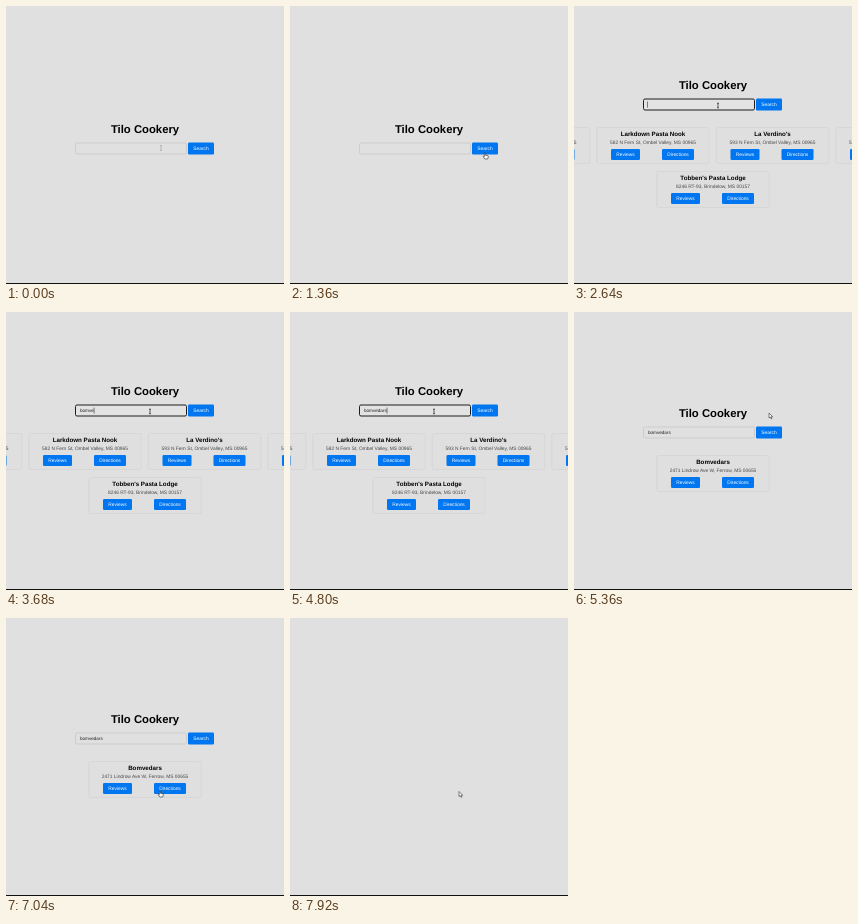
An HTML page for the animation above (8000 ms loop, 278 by 278 pixels).

```html
<!DOCTYPE html>
<html lang="en">
<head>
<meta charset="utf-8">
<title>Restaurant search</title>
<style>
html, body { margin: 0; width: 100%; height: 100%; overflow: hidden; background: #e0e0e0; }
svg { display: block; width: 100vw; height: 100vh; }
text { font: 4.87px "Liberation Sans", Arial, sans-serif; text-anchor: middle; text-rendering: geometricPrecision; }
.title { font-size: 11.3px; font-weight: bold; }
.name { font-size: 6.2px; font-weight: bold; }
.addr { fill: #484848; }
.label { fill: #fff; }
.btn { fill: #0076f0; }
.card { fill: #dfdfdf; stroke: #d2d2d2; stroke-width: .6; }
#query { font-size: 4.6px; text-anchor: start; fill: #222; }
</style>
</head>
<body>
<svg viewBox="0 0 278 278">
  <rect width="278" height="278" fill="#e0e0e0"/>
  <g id="page">
    <text class="title" x="139" y="127">Tilo Cookery</text>
    <rect id="field" x="69.5" y="137" width="111" height="11" rx="1.5"/>
    <text id="query" x="74" y="144.2"></text>
    <path id="caret" d="M73.5 139.6v6" stroke="#333" stroke-width=".6"/>
    <g id="search"></g>
  </g>
  <g id="many"></g>
  <g id="one"></g>
  <g id="cursor">
    <path id="beam" d="M-1 -2.3h2M0 -2.3v4.6M-1 2.3h2" fill="none" stroke="#222" stroke-width=".7"/>
    <path id="arrow" d="M0 0v5l1.2-1 .9 1.9 .9-.4-.9-1.8h1.6z" fill="#fff" stroke="#333" stroke-width=".6"/>
    <path id="hand" d="M-.6.2q.6-.6 1.1 0v2l2.5.6q.5.3.3 1.2l-.6 2h-2.8l-1.8-2.5q.2-.7 1.3.1z" fill="#fff" stroke="#222" stroke-width=".6"/>
  </g>
  <rect y="277" width="278" height="1" fill="#111"/>
</svg>
<script>
const LOOP = 8000, STEP = 80;
const MANY_AT = 1520, FOCUS_AT = 2400, TYPE_AT = 2880, KEY_MS = 180,
      BLUR_AT = 5200, ONE_AT = 5360, BLANK_AT = 7360;
const WORD = "bomvedars";
const $ = id => document.getElementById(id);

const button = (x, y, w, h, label) =>
  `<rect class="btn" x="${x}" y="${y}" width="${w}" height="${h}" rx="1.3"/>
   <text class="label" x="${x + w / 2}" y="${y + h / 2 + 1.7}">${label}</text>`;

const card = (cx, y, name, addr) =>
  `<rect class="card" x="${cx - 56.3}" y="${y}" width="112.6" height="36" rx="1.8"/>
   <text class="name" x="${cx}" y="${y + 8.6}">${name}</text>
   <text class="addr" x="${cx}" y="${y + 16.1}">${addr}</text>
   ${button(cx - 42, y + 21.5, 29, 11, "Reviews")}
   ${button(cx + 9, y + 21.5, 32, 11, "Directions")}`;

const cityAddr = n => `${n} N Fern St, Ombel Valley, MS 00965`;
$("search").innerHTML = button(182, 136.5, 26, 12, "Search");
$("many").innerHTML =
  card(-40.5, 121.5, "Garrow Grill", cityAddr(547)) +
  card(79, 121.5, "Larkdown Pasta Nook", cityAddr(582)) +
  card(198.5, 121.5, "La Verdino's", cityAddr(593)) +
  card(318, 121.5, "Bellin Bakery", cityAddr(561)) +
  card(139, 165.5, "Tobben's Pasta Lodge", "8246 RT-93, Brindelow, MS 00157");
$("one").innerHTML = card(139, 143.5, "Bomvedars", "2471 Lindrow Ave W, Ferrow, MS 00655");

// Pointer stops: time, x, y
const stops = [
  [0, 155, 142], [320, 155, 142], [880, 195, 146], [1360, 195, 147], [1680, 195, 147],
  [2320, 144, 99.5], [4800, 144, 99.5], [5160, 195, 101], [5480, 195, 101],
  [6160, 114, 168], [6400, 114, 168], [6800, 154, 173], [7360, 154, 173],
  [7760, 169, 173.5], [LOOP, 169, 173.5]
];

function pointer(t) {
  const i = stops.findIndex(s => s[0] > t);
  const [t0, x0, y0] = stops[i - 1], [t1, x1, y1] = stops[i];
  const p = (t - t0) / (t1 - t0), e = p * p * (3 - 2 * p);
  return [x0 + (x1 - x0) * e, y0 + (y1 - y0) * e];
}

const show = (id, on) => $(id).style.display = on ? "" : "none";

function pointerKind(x, y, rows, blank) {
  const inside = (l, top, w, h) => x >= l && x <= l + w && y >= top && y <= top + h;
  const top = 136.5 - 22 * rows;
  if (blank) return "arrow";
  if (inside(69, top, 111, 12)) return "beam";
  if (inside(182, top, 26, 12)) return "hand";
  if (rows === 1 && (inside(97, 165, 29, 11) || inside(148, 165, 32, 11))) return "hand";
  return "arrow";
}

function draw(t) {
  const blank = t >= BLANK_AT;
  const rows = t < MANY_AT ? 0 : t < ONE_AT ? 2 : 1;
  const focused = t >= FOCUS_AT && t < BLUR_AT;
  const typed = Math.max(0, Math.min(WORD.length, Math.ceil((t - TYPE_AT) / KEY_MS)));

  show("page", !blank);
  show("many", rows === 2);
  show("one", rows === 1 && !blank);
  $("page").setAttribute("transform", `translate(0 ${-22 * rows})`);

  const field = $("field");
  field.setAttribute("fill", focused ? "#e3e3e3" : "#e0e0e0");
  field.setAttribute("stroke", focused ? "#1c1c1c" : "#c4c4c4");
  field.setAttribute("stroke-width", focused ? 1 : .7);
  $("query").textContent = WORD.slice(0, typed);
  show("caret", focused && (typed > 0 && typed < WORD.length || (t - FOCUS_AT) % 1000 < 500));
  $("caret").setAttribute("transform", `translate(${typed ? $("query").getComputedTextLength() + .8 : 0} 0)`);

  const [x, y] = pointer(t);
  const kind = pointerKind(x, y, rows, blank);
  for (const k of ["beam", "arrow", "hand"]) show(k, k === kind);
  $("beam").setAttribute("opacity", focused ? 1 : .3);
  $("cursor").setAttribute("transform", `translate(${x} ${y})`);
}

const start = performance.now();
function tick() {
  const t = (performance.now() - start) % LOOP;
  draw(Math.floor(t / STEP) * STEP);
  requestAnimationFrame(tick);
}
tick();
</script>
</body>
</html>
```
